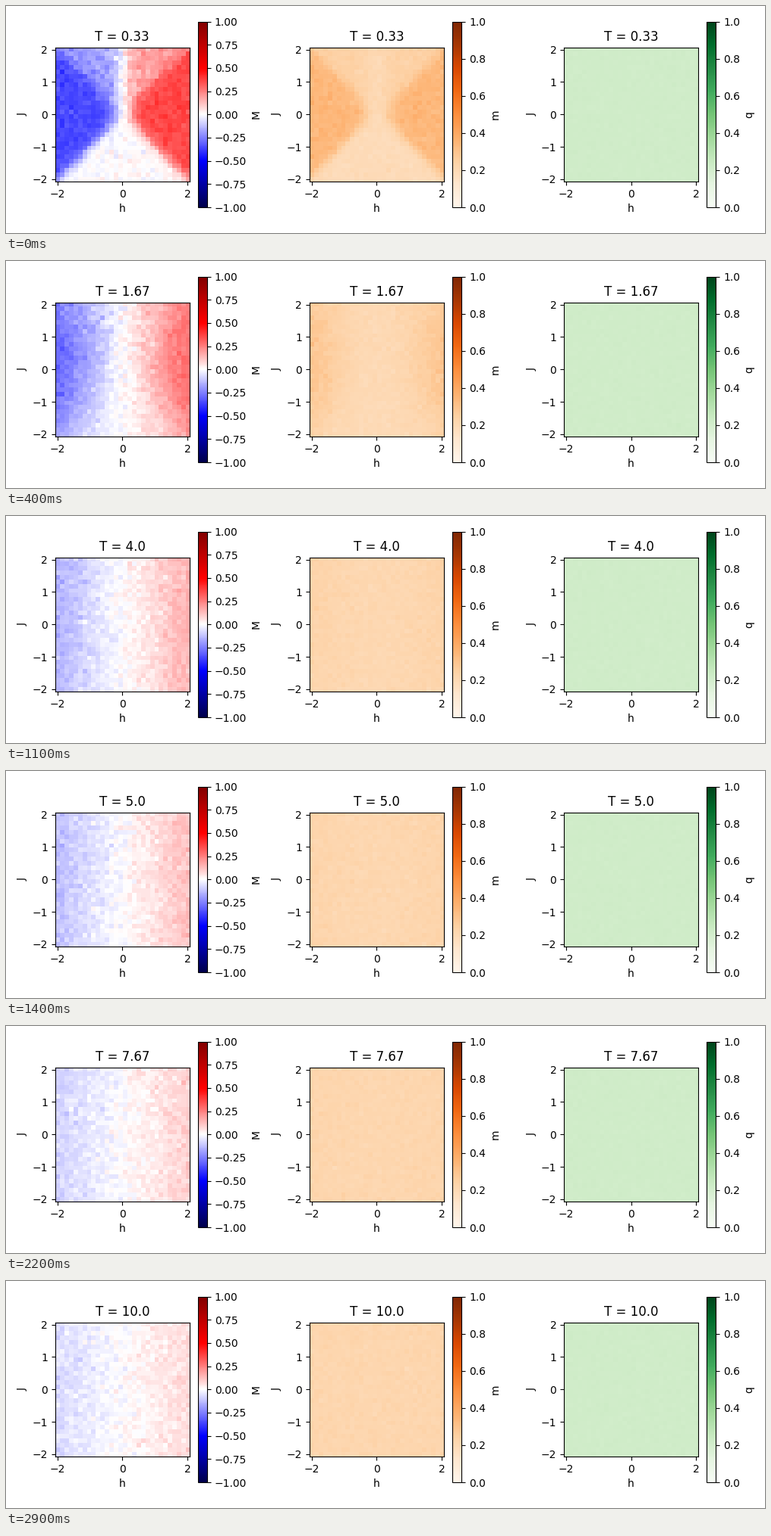
A matplotlib script for the animation above (3000 ms loop, 1000x300 px).

```python
import numpy as np
import matplotlib.pyplot as plt
from matplotlib.animation import FuncAnimation

FRAMES, INTERVAL = 30, 100
CELLS = 30
SATURATION = 0.36

plt.rcParams["font.family"] = "DejaVu Sans"
temperatures = np.linspace(1 / 3, 10, FRAMES)
axis_values = np.linspace(-2, 2, CELLS)
h, J = np.meshgrid(axis_values, axis_values)
edge = 2 + (axis_values[1] - axis_values[0]) / 2


def sigmoid(x):
    return 1 / (1 + np.exp(-x))


def fields(frame):
    """Noisy magnetisation M, local order m and overlap q on the (h, J) grid."""
    rng = np.random.default_rng(100 + frame)
    T = temperatures[frame]
    noise = rng.normal(size=(3, CELLS, CELLS))
    width = 0.38 * T
    coupling = 1 / (1 + (T / 3) ** 2)
    frustrated = coupling * sigmoid(-(np.abs(h) + J) / width)
    domains = coupling * sigmoid((J - np.abs(h)) / width)
    order = np.tanh(h / T) * (1 - frustrated) * (1 - 0.45 * domains)
    M = SATURATION * order + (0.02 + 0.012 * domains) * noise[0]
    m = (0.215 + 0.125 * order**2 - 0.02 * coupling * (1 - order**2)
         - 0.01 * frustrated + (0.008 + 0.006 * order**2) * noise[1])
    q = 0.215 + 0.003 * noise[2]
    return M, m, q


def add_panel(ax, label, cmap, vmin):
    image = ax.imshow(np.zeros((CELLS, CELLS)), cmap=cmap, vmin=vmin, vmax=1,
                      origin="lower", extent=(-edge, edge, -edge, edge),
                      interpolation="nearest")
    ax.set_xticks([-2, 0, 2])
    ax.set_yticks([-2, -1, 0, 1, 2])
    ax.set_xlabel("h")
    ax.set_ylabel("J")
    fig.colorbar(image, ax=ax, label=label)
    return image, ax.set_title("T")


fig, axes = plt.subplots(1, 3, figsize=(10, 3), dpi=100)
panels = [add_panel(axes[0], "M", "seismic", -1),
          add_panel(axes[1], "m", "Oranges", 0),
          add_panel(axes[2], "q", "Greens", 0)]
fig.tight_layout()


def update(frame):
    for (image, title), data in zip(panels, fields(frame)):
        image.set_data(data)
        title.set_text(f"T = {round(float(temperatures[frame]), 2)}")
    return [artist for panel in panels for artist in panel]


animation = FuncAnimation(fig, update, frames=FRAMES, interval=INTERVAL,
                          repeat=True, repeat_delay=0, blit=False)
plt.show()
```
